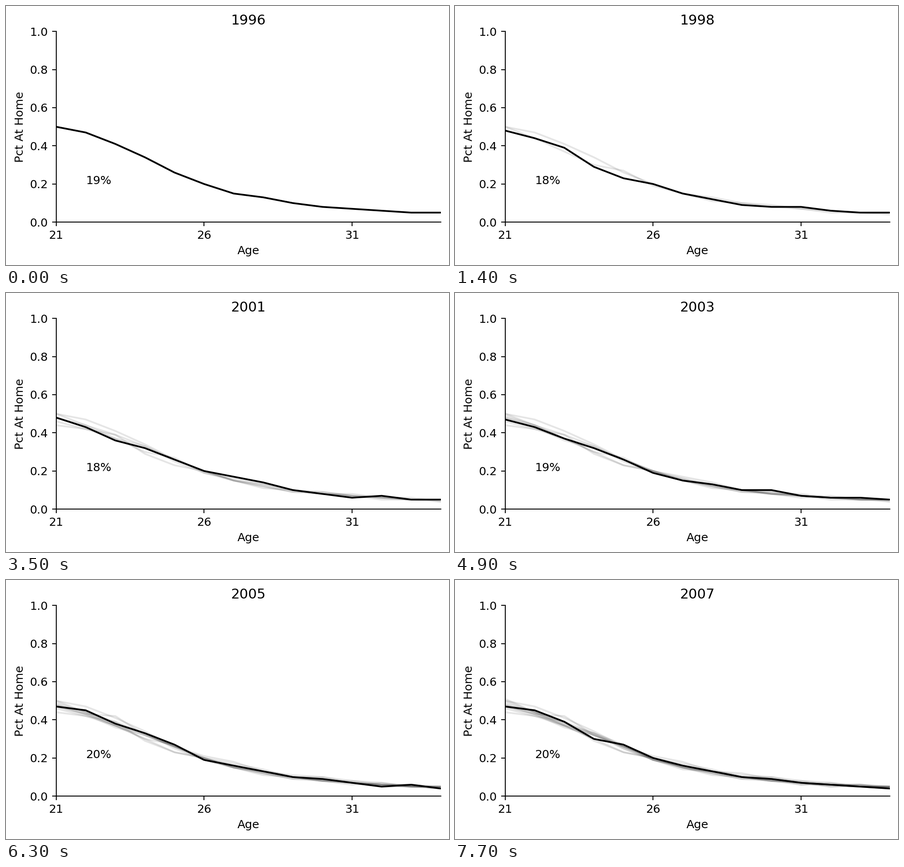
These frames come from a looping animation (978x573 px, 8 s). A matplotlib script:

```python
import matplotlib.pyplot as plt
from matplotlib.animation import FuncAnimation

W, H, DPI = 978, 573, 192
K = 182.67 / DPI          # scale of all point sizes
LEFT, RIGHT, TOP, BOTTOM = 110.7, 960, 56.2, 478.2
FPS, HOLD = 10, 0.7       # each year stays for HOLD seconds
FIRST_AGE = 21

# Typical percentage by age, and the runs of ages where a year departs from it.
TYPICAL = [47, 43, 37, 32, 26, 20, 15, 13, 10, 8, 7, 6, 5, 5]
RUNS = {
    1996: {21: [50, 47, 41, 34]},
    1997: {21: [50, 44, 37, 30, 27, 19], 28: [11], 30: [9], 32: [5], 34: [4]},
    1998: {21: [48, 44, 39, 29, 23], 28: [12, 9], 31: [8]},
    1999: {21: [44, 42, 39, 33], 28: [12, 9, 9]},
    2000: {21: [46, 42, 37, 33, 25, 19, 16], 33: [6, 4]},
    2001: {21: [48, 43, 36], 27: [17, 14], 31: [6, 7]},
    2002: {21: [49, 44, 37, 30, 23], 27: [16, 12]},
    2003: {26: [19], 30: [10], 33: [6]},
    2004: {23: [42], 26: [21, 18, 13, 11, 10, 8, 7, 5, 4]},
    2005: {22: [45, 38, 33, 27, 19, 16], 30: [9], 32: [5, 6, 4]},
    2006: {21: [51, 44, 38], 25: [25, 19, 14, 13, 12, 9, 6, 6, 6]},
    2007: {22: [45, 39, 30, 27, 20, 16], 30: [9], 34: [4]},
}
YEARS = list(RUNS)


def curve(year):
    pct = TYPICAL[:]
    for age, run in RUNS[year].items():
        i = age - FIRST_AGE
        pct[i:i + len(run)] = run
    return [p / 100 for p in pct]


def overall(year):
    if year in (1996, 2003):
        return 19
    return 18 if year < 2003 else 20


plt.rcParams.update({
    "font.family": "DejaVu Sans",
    "font.size": 10 * K,
    "axes.linewidth": 0.8 * K,
    "axes.titlepad": 6 * K,
    "axes.labelpad": 4 * K,
    "axes.spines.top": False,
    "axes.spines.right": False,
    "lines.linewidth": 1.5 * K,
})
for axis in ("xtick", "ytick"):
    plt.rcParams.update({
        f"{axis}.major.size": 3.5 * K,
        f"{axis}.major.width": 0.8 * K,
        f"{axis}.major.pad": 3.5 * K,
    })

fig = plt.figure(figsize=(W / DPI, H / DPI), dpi=DPI, facecolor="white")
ax = fig.add_axes([LEFT / W, 1 - BOTTOM / H, (RIGHT - LEFT) / W, (BOTTOM - TOP) / H])
ax.set(xlim=(21, 34), ylim=(0, 1), xticks=[21, 26, 31],
       xlabel="Age", ylabel="Pct At Home")
title = ax.set_title("")
label = ax.text(22, 0.2, "")
ages = range(FIRST_AGE, FIRST_AGE + len(TYPICAL))
lines = [ax.plot(ages, curve(year), color="black")[0] for year in YEARS]


def draw(frame):
    now = frame // round(HOLD * FPS)
    for i, line in enumerate(lines):
        line.set_visible(i <= now)
        line.set_alpha(1 if i == now else 0.1)
    title.set_text(str(YEARS[now]))
    label.set_text(f"{overall(YEARS[now])}%")
    return [*lines, title, label]


anim = FuncAnimation(fig, draw, frames=8 * FPS, interval=1000 // FPS,
                     repeat=True, repeat_delay=0, blit=False)
plt.show()
```
